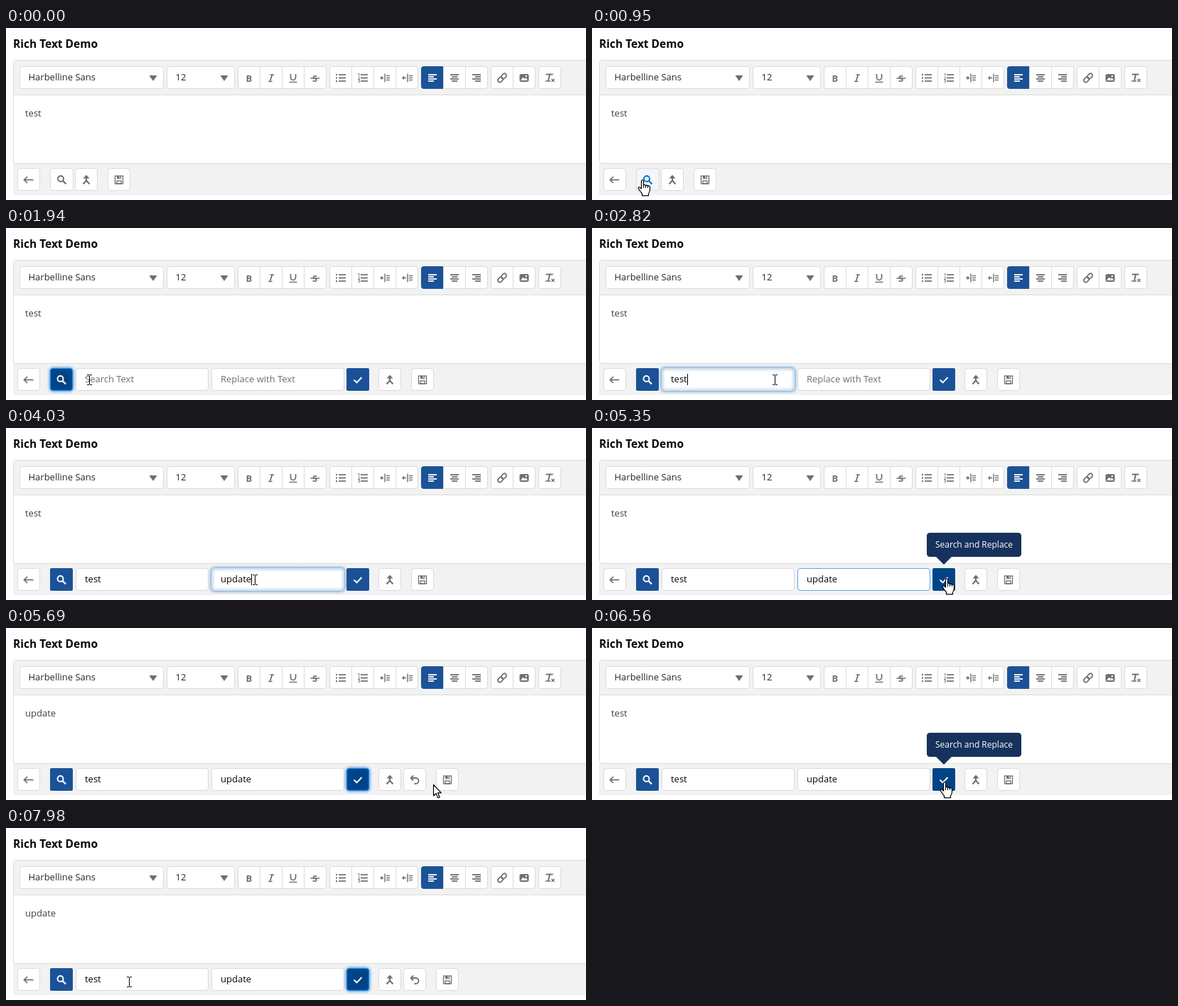
Recreate the animation shown at these times as an HTML page with a canvas. Size 816x243 px, loop 8000 ms.

```html
<!DOCTYPE html>
<html lang="en">
<head>
<meta charset="utf-8">
<title>Rich Text Demo</title>
<style>
  html, body { margin: 0; width: 100%; height: 100%; overflow: hidden; background: #fff; }
  canvas { display: block; width: 816px; height: 243px; }
</style>
</head>
<body>
<canvas id="stage" width="816" height="243"></canvas>
<script>
const ctx = document.getElementById('stage').getContext('2d');
const LOOP = 8000;
const SANS = '"Open Sans", "Noto Sans", sans-serif';
const GREY = '#706e6b', LINE = '#dddbda', PANEL = '#f2f2f2';
const BLUE = '#1b5297', DARK = '#014486', NAVY = '#16325c', RING = '#1589ee';

// Pointer moves: start, end, steps, x, y
const START = [612, 175];
const MOVES = [
  [100, 830, 8, 77, 213], [950, 950, 1, 71, 214], [1720, 1940, 3, 117, 214],
  [2600, 3040, 5, 350, 214], [4470, 5130, 7, 496, 215], [5250, 5250, 1, 499, 212],
  [5570, 5690, 2, 601, 221], [5800, 6020, 3, 577, 215], [6350, 6560, 3, 496, 217],
  [7000, 7000, 1, 608, 231], [7340, 7340, 1, 493, 217], [7770, 7980, 3, 173, 217]
];
const SEARCH_KEYS = [[2160, 't'], [2270, 'te'], [2380, 'tes'], [2500, 'test']];
const REPLACE_KEYS = [[3470, 'u'], [3800, 'up'], [3910, 'upda'], [4030, 'update']];

const within = (t, a, b) => t >= a && t < b;
const typed = (keys, t) => keys.reduce((s, [at, str]) => t >= at ? str : s, '');

function text(str, x, y, color, font = '13px') {
  ctx.font = font + ' ' + SANS;
  ctx.fillStyle = color;
  ctx.fillText(str, x, y);
}

function box(x, y, w, h, fill, border = fill, r = 3.5) {
  ctx.beginPath();
  ctx.roundRect(x + 0.5, y + 0.5, w - 1, h - 1, r);
  ctx.fillStyle = fill;
  ctx.fill();
  ctx.strokeStyle = border;
  ctx.lineWidth = 1;
  ctx.stroke();
}

function glow(x, y, w, h, fill) {
  ctx.save();
  ctx.shadowColor = '#0070d2';
  ctx.shadowBlur = 4;
  box(x, y, w, h, fill, RING);
  ctx.restore();
}

function line(color, width, ...pts) {
  ctx.beginPath();
  for (let i = 0; i < pts.length; i += 2) ctx.lineTo(pts[i], pts[i + 1]);
  ctx.strokeStyle = color;
  ctx.lineWidth = width;
  ctx.stroke();
}

function shape(color, ...pts) {
  ctx.beginPath();
  for (let i = 0; i < pts.length; i += 2) ctx.lineTo(pts[i], pts[i + 1]);
  ctx.closePath();
  ctx.fillStyle = color;
  ctx.fill();
}

function at(x, y, draw, ...args) {
  ctx.save();
  ctx.translate(x, y);
  draw(...args);
  ctx.restore();
}

// Icons are drawn around their own centre
function bars(align, color) {
  [12, 8, 12, 8].forEach((w, i) => {
    const x = [-6, -w / 2, 6 - w][align], y = -4.5 + i * 3;
    line(color, 1.8, x, y, x + w, y);
  });
}

function indent(dir) {
  line(GREY, 1.4, 0, -6, 0, 6);
  line(GREY, 1.5, -7, 0, -2, 0);
  if (dir > 0) shape(GREY, -5, -3, -2, 0, -5, 3);
  else shape(GREY, -5, -3, -8, 0, -5, 3);
  for (const y of [-3, 0, 3]) line(GREY, 1.4, 2, y, 7, y);
}

function list(numbered) {
  for (let i = 0; i < 3; i++) {
    const y = -4.5 + i * 4.5;
    line(GREY, 1.7, -3, y, 7, y);
    if (numbered) text(i + 1, -7, y + 2, GREY, 'bold 5.5px');
    else line(GREY, 2, -7, y, -5, y);
  }
}

function link() {
  ctx.rotate(-Math.PI / 4);
  ctx.strokeStyle = GREY;
  ctx.lineWidth = 1.7;
  for (const x of [-7.5, -0.5]) {
    ctx.beginPath();
    ctx.roundRect(x, -2.8, 8, 5.6, 2.8);
    ctx.stroke();
  }
}

function picture() {
  box(-6.5, -5.5, 13, 11, GREY, GREY, 1.5);
  shape('#fff', -5, 3.5, -1.5, -1, 0.5, 1.5, 2.5, -0.5, 5, 3.5);
  ctx.beginPath();
  ctx.arc(2.8, -2.5, 1.2, 0, 7);
  ctx.fill();
}

function clearStyle() {
  line(GREY, 1.9, -5.5, -5, 4.5, -5);
  line(GREY, 1.9, 0, -5, -2, 4);
  line(GREY, 1.5, -6, 4.5, 1, 4.5);
  line(GREY, 1.5, 2.5, 1.5, 6.5, 5.5);
  line(GREY, 1.5, 6.5, 1.5, 2.5, 5.5);
}

function magnifier(color) {
  ctx.beginPath();
  ctx.arc(-1.5, -1.5, 4, 0, 7);
  ctx.strokeStyle = color;
  ctx.lineWidth = 1.9;
  ctx.stroke();
  line(color, 2.3, 1.5, 1.5, 6, 6);
}

function back() {
  line(GREY, 1.7, -6.5, 0, 6.5, 0);
  line(GREY, 1.7, -2, -4.5, -6.5, 0, -2, 4.5);
}

function merge() {
  shape(GREY, 0, -7, 4.5, -2, -4.5, -2);
  line(GREY, 2, 0, -3, 0, 1.5);
  line(GREY, 2, -4.5, 6, 0, 1, 4.5, 6);
}

function undo() {
  ctx.beginPath();
  ctx.moveTo(-5, -2.5);
  ctx.lineTo(1.5, -2.5);
  ctx.arc(1.5, 1.5, 4, -Math.PI / 2, Math.PI / 2);
  ctx.lineTo(-0.5, 5.5);
  ctx.strokeStyle = GREY;
  ctx.lineWidth = 1.8;
  ctx.stroke();
  line(GREY, 1.8, -2, -6, -5.5, -2.5, -2, 1);
}

function disk() {
  ctx.strokeStyle = GREY;
  ctx.lineWidth = 1.3;
  ctx.strokeRect(-5.5, -5.5, 11, 11);
  ctx.strokeRect(-3, 1.5, 6, 4);
  ctx.fillStyle = GREY;
  ctx.fillRect(-3, -5.5, 6, 4);
  ctx.fillStyle = '#fff';
  ctx.fillRect(0.5, -5, 1.3, 2.5);
}

function tick() { line('#fff', 1.9, -5.5, 0, -1.5, 4, 5.5, -3.5); }

function group(x, count) {
  const w = count * 31 + 1;
  box(x, 54, w, 32, '#fff', LINE);
  for (let i = 1; i < count; i++) line(LINE, 1, x + i * 31 + 0.5, 55, x + i * 31 + 0.5, 85);
}

function dropdown(x, w, label) {
  box(x, 54, w, 32, '#fff', LINE);
  text(label, x + 12.5, 74, '#2b2826');
  const cx = x + w - 15;
  shape(GREY, cx - 5.5, 67, cx + 5.5, 67, cx, 75);
}

function editor(content) {
  text('Rich Text Demo', 10, 28, '#080707', 'bold 15.5px');
  box(10, 45, 830, 147, '#fff', LINE);
  ctx.fillStyle = PANEL;
  ctx.fillRect(11, 46, 805, 48);
  line(LINE, 1, 11, 94.5, 816, 94.5);
  ctx.fillStyle = PANEL;
  ctx.fillRect(10, 192, 806, 44);
  text(content, 27, 125, '#3e3e3c');

  dropdown(19, 203, 'Harbelline Sans');
  dropdown(226, 96, '12');
  [[326, 4], [455, 4], [584, 3], [682, 2], [749, 1]].forEach(g => group(...g));
  ctx.fillStyle = BLUE;
  ctx.beginPath();
  ctx.roundRect(584, 54, 31, 32, [4, 0, 0, 4]);
  ctx.fill();

  text('B', 337.5, 75.5, GREY, 'bold 13px');
  line(GREY, 1.7, 374.5, 66, 371.5, 75);
  line(GREY, 1.4, 371.5, 66, 377, 66);
  line(GREY, 1.4, 369, 75.5, 374.5, 75.5);
  ctx.beginPath();
  ctx.moveTo(400.5, 65);
  ctx.lineTo(400.5, 70);
  ctx.arc(404, 70, 3.5, Math.PI, 0, true);
  ctx.lineTo(407.5, 65);
  ctx.lineWidth = 1.7;
  ctx.stroke();
  line(GREY, 1.4, 398.5, 76.5, 409.5, 76.5);
  text('S', 431, 75.5, GREY, 'bold 13px');
  line(GREY, 1.5, 428.5, 71, 441.5, 71);

  at(471, 70.5, list, false);
  at(502, 70.5, list, true);
  at(533, 70.5, indent, 1);
  at(565, 70.5, indent, -1);
  [600, 631, 662].forEach((x, i) => at(x, 70.5, bars, i, i ? GREY : '#fff'));
  at(698, 70.5, link);
  at(729, 70.5, picture);
  at(765, 70.5, clearStyle);
}

function button(x, icon, w = 32) {
  box(x, 198, w, 32, '#fff', LINE);
  at(x + 16, 214.5, icon);
}

function field(x, value, hint, focus, caret, border = LINE) {
  if (focus) {
    glow(x, 198, 187, 32, '#fff');
    ctx.lineWidth = 1.6;
    ctx.stroke();
  } else box(x, 198, 187, 32, '#fff', border);
  text(value || hint, x + 13, 218, value ? '#080707' : GREY);
  if (caret) {
    const cx = Math.round(x + 13 + (value ? ctx.measureText(value).width : 0)) + 0.5;
    line('#000', 1, cx, 206, cx, 222);
  }
}

function primary(x, focus, hover, draw) {
  if (focus) glow(x, 198, 32, 32, DARK);
  else {
    ctx.fillStyle = hover ? DARK : BLUE;
    ctx.beginPath();
    ctx.roundRect(x, 198, 32, 32, 2);
    ctx.fill();
  }
  at(x + 16, 214.5, draw, '#fff');
}

function tooltip(x, w, label) {
  box(x, 148, w, 34, NAVY);
  shape(NAVY, x + 12, 181, x + 36, 181, x + 24, 193);
  text(label, x + 12, 169, '#fff', '12px');
}

function footer(t, open, done, p) {
  const over = x => p && within(p.x, x, x + 32) && within(p.y, 198, 230);
  button(16, back);
  if (!open) {
    box(62, 198, 33, 32, over(62) ? '#f4f6f9' : '#fff', LINE);
    at(78.5, 214.5, magnifier, over(62) ? '#0070d2' : GREY);
    button(97, merge);
    button(143, disk);
    return;
  }
  primary(62, t < 2050, over(62), magnifier);
  const blink = t < 4470 || Math.floor((t - 4470) / 530) % 2;
  const inSearch = within(t, 2050, 3040), inReplace = within(t, 3040, 5350);
  field(98, typed(SEARCH_KEYS, t), 'Search Text', inSearch, inSearch);
  field(289, typed(REPLACE_KEYS, t), 'Replace with Text', inReplace, inReplace && blink,
    within(t, 5350, 5460) ? '#5aa9ee' : LINE);
  primary(479, done, over(479), tick);
  button(524, merge);
  if (done) button(559, undo);
  button(done ? 605 : 570, disk);
}

function pointer(t) {
  if (t < 100 || within(t, 6800, 7000)) return null;
  let [x, y] = START;
  for (const [t0, t1, n, tx, ty] of MOVES) {
    if (t < t0) break;
    const k = t1 > t0 ? Math.floor((t + 12 - t0) / (t1 - t0) * (n - 1)) : n - 1;
    const f = Math.min(1, (k + 1) / n);
    x += (tx - x) * f;
    y += (ty - y) * f;
  }
  return { x, y };
}

function pointerKind({ x, y }, open, done) {
  if (within(y, 95, 191)) return beam;
  if (!within(y, 198, 230)) return arrow;
  if (open && (within(x, 98, 285) || within(x, 289, 476))) return beam;
  const buttons = open ? [16, 62, 479, 524, done ? 559 : 570, done ? 605 : 570] : [16, 62, 97, 143];
  return buttons.some(b => within(x, b, b + 32)) ? hand : arrow;
}

function beam() {
  line('#000', 1, 0.5, -6, 0.5, 7);
  for (const y of [-6.5, 7.5]) {
    line('#000', 1, -3, y, 0, y);
    line('#000', 1, 1, y, 4, y);
  }
}

function outline() {
  ctx.closePath();
  ctx.fillStyle = '#fff';
  ctx.fill();
  ctx.strokeStyle = '#000';
  ctx.lineWidth = 1.2;
  ctx.lineJoin = 'round';
  ctx.stroke();
}

function arrow() {
  ctx.beginPath();
  [[0.5, 0.5], [0.5, 16], [4, 12.7], [6.8, 19], [9.2, 18], [6.5, 11.8], [11.3, 11.8]]
    .forEach(p => ctx.lineTo(...p));
  outline();
}

function hand() {
  ctx.beginPath();
  ctx.moveTo(-1.5, 13);
  ctx.lineTo(-1.5, 2);
  ctx.quadraticCurveTo(0, -1, 1.5, 2);
  ctx.lineTo(1.5, 8);
  for (const x of [1.5, 4.5, 7.5]) ctx.quadraticCurveTo(x + 2, 5.5 + x / 4, x + 3, 9 + x / 5);
  ctx.lineTo(10.5, 15);
  ctx.quadraticCurveTo(10, 18, 8.5, 20);
  ctx.lineTo(8.5, 22.8);
  ctx.lineTo(-0.5, 22.8);
  ctx.lineTo(-0.5, 20);
  ctx.quadraticCurveTo(-4, 16, -5.8, 12.5);
  ctx.quadraticCurveTo(-5.5, 9, -1.5, 13);
  outline();
  for (const x of [1.5, 4.5, 7.5]) line('#000', 1, x, 8, x, 12);
}

function render(t) {
  ctx.fillStyle = '#fff';
  ctx.fillRect(0, 0, 816, 243);
  const open = t >= 1170;
  const done = within(t, 5460, 6240) || t >= 7450;
  const p = pointer(t);
  editor(done ? 'update' : 'test');
  footer(t, open, done, p);
  if (within(t, 5250, 5460) || within(t, 6560, 6800) || within(t, 7340, 7450))
    tooltip(471, 133, 'Search and Replace');
  if (within(t, 6020, 6240)) tooltip(552, 129, 'Undo Last Change');
  if (p) at(Math.round(p.x), Math.round(p.y), pointerKind(p, open, done));
}

function loop() {
  render(performance.now() % LOOP);
  requestAnimationFrame(loop);
}
loop();
</script>
</body>
</html>
```
